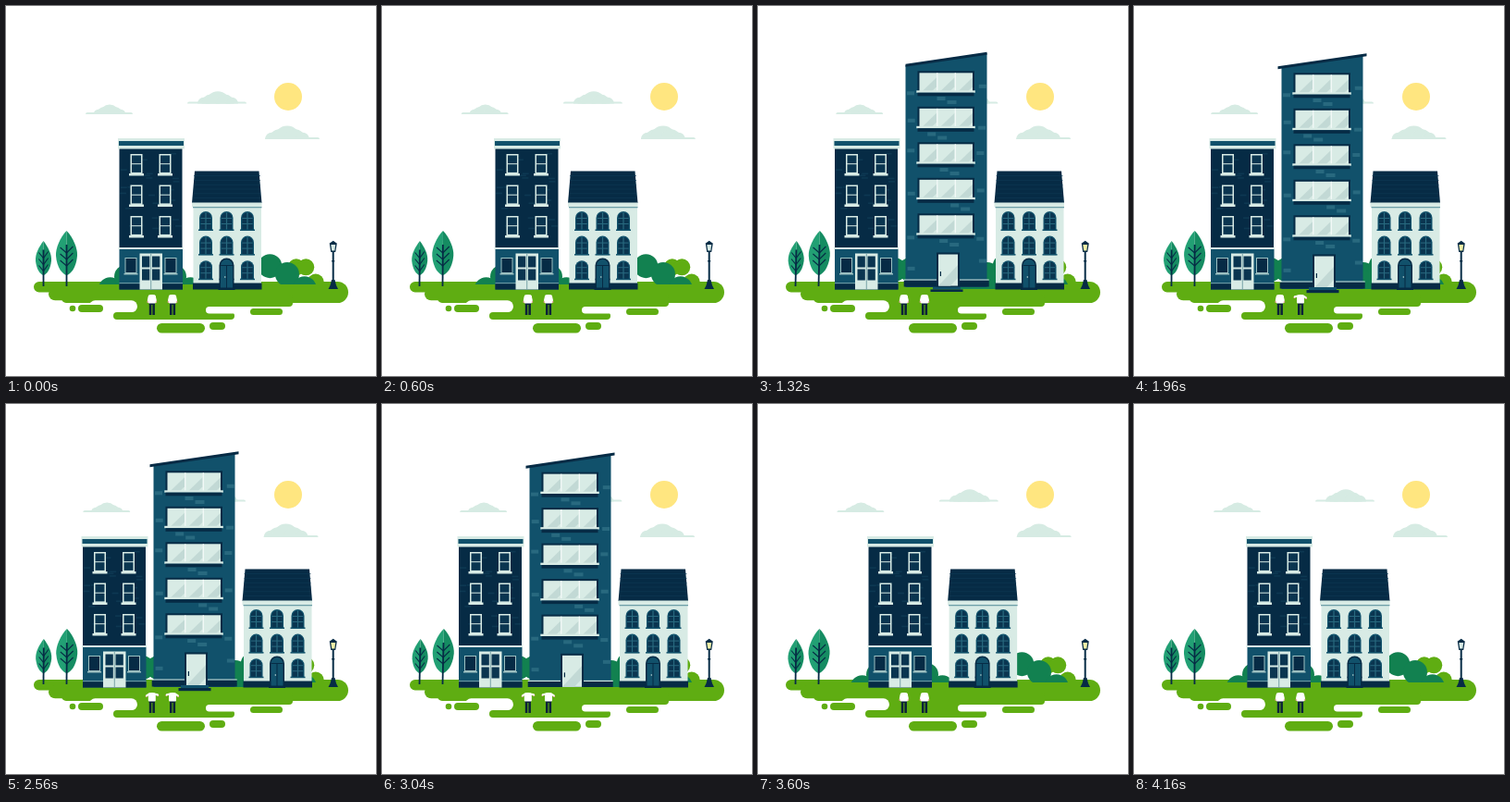
Write an HTML page with a canvas that moves like this. It is 400 px wide and 400 px high and loops after 4.2 s.

```html
<!DOCTYPE html>
<html lang="en">
<head>
<meta charset="utf-8">
<title>Street</title>
<style>
html, body { margin: 0; width: 100%; height: 100%; overflow: hidden; background: #fff; }
canvas { display: block; width: 400px; height: 400px; }
</style>
</head>
<body>
<canvas id="stage"></canvas>
<script>
const canvas = document.getElementById('stage');
const ctx = canvas.getContext('2d');
const dpr = window.devicePixelRatio || 1;
canvas.width = canvas.height = 400 * dpr;

const LOOP = 4200, STEP = 40, FLOOR = 306;
const NAVY = '#062b45', DEEP = '#0a3550', TEAL = '#11516b', BRICK = '#28697f';
const PALE = '#d8ebe5', GLASS = '#c2d9d5', CLOUD = '#d6ebe3', SUN = '#ffe680';
const GRASS = '#5fad12', BUSH = '#128150';

// Drawing helpers
function rect(x, y, w, h, color) {
  ctx.fillStyle = color;
  ctx.fillRect(x, y, w, h);
}
function poly(color, ...pts) {
  ctx.fillStyle = color;
  ctx.beginPath();
  for (let i = 0; i < pts.length; i += 2) ctx.lineTo(pts[i], pts[i + 1]);
  ctx.fill();
}
function circle(x, y, r, color) {
  ctx.fillStyle = color;
  ctx.beginPath();
  ctx.arc(x, y, r, 0, Math.PI * 2);
  ctx.fill();
}
function pill(x, y, w, h, color = GRASS, r = Math.min(w, h) / 2) {
  ctx.fillStyle = color;
  ctx.beginPath();
  ctx.roundRect(x, y, w, h, r);
  ctx.fill();
}
function line(color, width, ...pts) {
  ctx.strokeStyle = color;
  ctx.lineWidth = width;
  ctx.beginPath();
  for (let i = 0; i < pts.length; i += 2) ctx.lineTo(pts[i], pts[i + 1]);
  ctx.stroke();
}
function arch(x, y, w, h, color) {
  pill(x, y, w, h, color, [w / 2, w / 2, 0, 0]);
}
function shifted(dx, dy, draw) {
  ctx.save();
  ctx.translate(dx, dy);
  draw();
  ctx.restore();
}
// Runs draw with everything below the line y hidden
function above(y, draw) {
  ctx.save();
  ctx.beginPath();
  ctx.rect(0, 0, 400, y);
  ctx.clip();
  draw();
  ctx.restore();
}
// Calls draw for every cell of a grid
function grid(cols, rows, draw) {
  for (let r = 0; r < rows; r++) for (let c = 0; c < cols; c++) draw(c, r);
}
function seeded(seed) {
  return () => (seed = seed * 16807 % 2147483647) / 2147483647;
}

// Timing helpers
const ramp = (t, a, b) => Math.max(0, Math.min(1, (t - a) / (b - a)));
const inOut = x => x < .5 ? 4 * x ** 3 : 1 - 4 * (1 - x) ** 3;
const outBack = (x, s) => 1 + (s + 1) * (x - 1) ** 3 + s * (x - 1) ** 2;
const pulse = (t, a, b, c, d) => inOut(ramp(t, a, b)) - inOut(ramp(t, c, d));

// Bumps shrink away from the peak, cut off along a flat base
function cloud(left, right, base, peak, height) {
  above(base, () => {
    pill(left, base - 2, right - left, 4, CLOUD);
    for (let k = -1; k <= 1; k += .5) {
      circle(peak + k * height * 1.15, base, height * (1 - .5 * Math.abs(k)), CLOUD);
    }
  });
}

function sky(sway) {
  circle(305, 98, 15, SUN);
  shifted(-3 * sway, 0, () => cloud(86, 137, 117, 112, 10.5));
  shifted(-sway, 0, () => cloud(196, 260, 105.5, 229, 13.3));
  shifted(-1.5 * sway, 0, () => cloud(280, 339, 144, 304, 14.5));
}

function ground() {
  pill(30, 298, 60, 11.5);
  pill(46, 304, 110, 14.3);
  pill(60, 298, 310, 23, GRASS, [5, 11.5, 11.5, 5]);
  pill(180, 312, 130, 13, GRASS, [0, 4, 4, 0]);
  rect(136, 306, 88, 32, GRASS);
  pill(116, 331, 131, 8);
  pill(90, 318.3, 52, 12.7, '#fff');
  pill(216, 325, 60, 7.5, '#fff');
  circle(72, 327, 3.3, GRASS);
  pill(78, 323, 27, 8);
  pill(264, 327, 35, 7);
  pill(163, 343, 52, 10.5);
  pill(220, 342, 17, 8);
}

// Circles whose tops follow half a sine wave
function bush(left, right, height, n, r, color) {
  for (let i = 0; i < n; i++) {
    const u = (i + .5) / n;
    circle(left + (right - left) * u, 301 - height * Math.sin(Math.PI * u) + r, r, color);
  }
}

function bushes() {
  above(301, () => {
    bush(298, 340, 30, 4, 9, GRASS);
    bush(104, 208, 30, 6, 13, BUSH);
    bush(220, 332, 34, 6, 13, BUSH);
  });
  poly(BUSH, 214, FLOOR, 236, 283, 270, 290, 270, FLOOR);
}

function tree(x, top, half, tilt) {
  const low = 291, mid = (top + low) / 2;
  ctx.save();
  ctx.transform(1, 0, -tilt, 1, 303 * tilt, 0);
  for (const [side, color] of [[-1, '#22a074'], [1, '#158c62']]) {
    ctx.fillStyle = color;
    ctx.beginPath();
    ctx.moveTo(x, top);
    ctx.bezierCurveTo(x + side * half * .6, top + 7, x + side * half * 1.05, mid - 5, x + side * half, mid + 3);
    ctx.bezierCurveTo(x + side * half * .9, low - 7, x + side * 4, low - 1, x, low);
    ctx.fill();
  }
  line(NAVY, 1.8, x, mid - 9, x, 303);
  for (let i = 0; i < 3; i++) {
    const y = mid - 1 + i * 7, w = half * .6;
    line(NAVY, 1.1, x - w, y - 5, x, y + 1, x + w, y - 6);
  }
  ctx.restore();
}

function lamp(lit) {
  rect(352.7, 266, 2, 35, NAVY);
  poly(NAVY, 349.3, 257, 353.7, 253.8, 358.2, 257);
  poly(NAVY, 349.8, 257, 357.7, 257, 356.2, 266, 351.2, 266);
  poly(lit ? '#f2f0a6' : PALE, 351.3, 258, 356.2, 258, 355.3, 264.5, 352.2, 264.5);
  rect(352.2, 275, 3, 1.5, NAVY);
  poly(NAVY, 352, 296, 355.5, 296, 357, 302, 359, FLOOR, 348.5, FLOOR, 350.5, 302);
}

function sashWindow(x, y) {
  rect(x - 6.5, y, 13, 22, PALE);
  for (const top of [1.5, 11.2]) rect(x - 5, y + top, 10, 8.7, DEEP);
  rect(x - 8, y + 21, 16, 2.5, PALE);
}

function shop() {
  const rand = seeded(11);
  rect(122.5, 150, 68, 112, NAVY);
  for (let i = 0; i < 26; i++) rect(123 + rand() * 60, 157 + rand() * 100, 7, 1.6, '#0d3852');
  rect(121, 143, 72, 11.5, PALE);
  rect(122, 146, 70, 5, TEAL);
  grid(2, 3, (c, r) => sashWindow(141 + c * 31, 160 + r * 33.5));

  rect(122.5, 261, 68.5, 45.5, TEAL);
  rect(121.5, 261, 70, 2, PALE);
  rect(122.5, 299.3, 68.5, 1, '#8fb5b8');
  rect(122.5, 300.3, 68.5, 6.2, NAVY);
  for (const x of [128.5, 171.5]) {
    rect(x, 272, 13, 17, '#9dc0c1');
    rect(x + 1, 273, 11, 15, NAVY);
    rect(x - 1, 289, 15, 1.5, '#9dc0c1');
  }
  rect(144.5, 267.5, 24.5, 39, PALE);
  grid(2, 2, (c, r) => rect(147 + c * 11, 270.5 + r * 14, 8.3, 12, DEEP));
  rect(156.3, 268, .9, 38.5, '#6d9aa2');
}

function archWindow(x, y) {
  arch(x - 7, y, 14, 20.5, TEAL);
  arch(x - 5.7, y + 1.3, 11.4, 19, DEEP);
  rect(x - .6, y + 1, 1.2, 19, BRICK);
  for (const bar of [7, 13]) rect(x - 5.7, y + bar, 11.4, 1, BRICK);
  rect(x - 8, y + 19.5, 16, 1.5, TEAL);
}

function house() {
  rect(202.5, 214, 73.5, 88, PALE);
  poly(NAVY, 204, 178.5, 273.5, 178.5, 276.5, 213, 201, 213);
  for (let i = 1; i < 7; i++) rect(203, 178.5 + i * 4.8, 72, .6, '#0e3954');
  rect(201, 212.5, 75.5, 4.5, PALE);
  rect(202, 217, 74.5, 1.3, '#6d9fa8');
  grid(3, 3, (c, r) => archWindow(216 + c * 22.5, 222 + r * 26.6));
  rect(202, 299.5, 74.5, 7, NAVY);
  arch(230.5, 272.5, 16, 34, NAVY);
  arch(232, 274, 13, 32.5, TEAL);
  rect(232, 280, 13, 1, NAVY);
  rect(238, 281, 1, 25, NAVY);
  circle(236.8, 293, .7, PALE);
  rect(229.5, 304.5, 18, 2.5, NAVY);
}

function officeWindow(y) {
  rect(172.5, y, 61.5, 23, NAVY);
  rect(174.5, y + 2, 57.5, 20, PALE);
  for (let i = 0; i < 3; i++) {
    const x = 174.5 + i * 19.5;
    poly(GLASS, x + 3, y + 22, x + 18.5, y + 7, x + 18.5, y + 17, x + 13.5, y + 22);
    if (i) rect(x - .8, y + 2, 1.2, 20, '#f6fbf9');
  }
  rect(171.3, y + 21, 63.5, 2.4, PALE);
  rect(172.5, y + 23.4, 61, 3.6, NAVY);
}

// Each storey has loose bricks beside its window and a pair below it
function bricks() {
  const rand = seeded(29);
  for (let floor = 0; floor < 6; floor++) {
    const y = 72 + floor * 38.5;
    rect(161 + rand() * 2, y + 6 + rand() * 20, 8, 4, BRICK);
    rect(236 + rand() * 3, y + 10 + rand() * 16, 8, 4, BRICK);
    if (floor === 5) continue;
    const x = 180 + rand() * 30;
    rect(x, y + 28, 9, 4, BRICK);
    rect(x + 11, y + 32, 10, 4, BRICK);
  }
}

function office(overhang) {
  poly(TEAL, 159.5, 66, 247.5, 53, 247.5, FLOOR, 159.5, FLOOR);
  bricks();
  const roofY = x => 65.3 - (x - 156) * .147;
  const a = 159.5 - overhang, b = 247.5 + overhang;
  poly(NAVY, a, roofY(a), b, roofY(b), b, roofY(b) + 3, a, roofY(a) + 3);
  for (let i = 0; i < 5; i++) officeWindow(72.3 + i * 38.5);
  rect(157.7, 297.5, 92, 1.2, PALE);
  rect(157.7, 298.7, 92, 6.8, NAVY);
  rect(193, 268.5, 25, 37, NAVY);
  rect(195, 270.5, 21, 34, PALE);
  poly(GLASS, 195, 304.5, 216, 282, 216, 296, 208, 304.5);
  rect(196.8, 289, 1.2, 5, NAVY);
}

function man(x, left, right) {
  const dark = '#0b2238';
  for (const leg of [-3, .6]) rect(x + leg, 320, 2.5, 14, dark);
  rect(x - 3, 320, 6.1, 3, dark);
  ctx.lineCap = 'round';
  for (const [side, lift] of [[-1, left], [1, right]]) {
    const hx = x + side * (4.3 + 2.2 * lift), hy = 319.5 - 5 * lift;
    circle(hx, hy + .4, 1.1, '#e8a79c');
    line('#fff', 2.2, x + side * 2.8, 313.5, hx - side * .4, hy - 1.2 + lift);
  }
  ctx.lineCap = 'butt';
  pill(x - 4, 312, 8, 9.5, '#fff', [3, 3, 1, 1]);
}

function draw(t) {
  const turn = Math.max(0, t - 200) / 4000 * Math.PI * 2;
  const sway = (1 - Math.cos(turn)) / 2;
  const tilt = .012 * (1 - Math.cos(turn * 2));
  const open = pulse(t, 590, 1210, 3160, 3760);
  const rise = outBack(ramp(t, 960, 1520), .65) - inOut(ramp(t, 2960, 3690));
  const overhang = 4 * pulse(t, 1360, 1600, 3060, 3300);
  const step = pulse(t, 1180, 1400, 2840, 3020);

  ctx.setTransform(dpr, 0, 0, dpr, 0, 0);
  rect(0, 0, 400, 400, '#fff');
  sky(sway);
  ground();
  bushes();
  tree(40.5, 254, 8.5, tilt);
  tree(65.5, 243, 11.5, tilt);
  lamp(t >= 1120 && t < 3840);
  if (rise > 0) above(FLOOR, () => shifted(0, 255 * (1 - rise), () => office(overhang)));
  if (step > 0) {
    rect(189, 304, 30, 3 * step, TEAL);
    rect(186.5, 304 + 3 * step, 35, 3.2 * step, NAVY);
  }
  shifted(-39.5 * open, 0, shop);
  shifted(54.5 * open, 0, house);
  const point = pulse(t, 2360, 2600, 3340, 3600);
  const shrug = pulse(t, 1640, 1880, 3060, 3300);
  man(157.8, point * .8, point);
  man(180, shrug, shrug * .8);
}

const start = performance.now();
function tick() {
  const t = (performance.now() - start) % LOOP;
  draw(Math.floor(t / STEP) * STEP);
  requestAnimationFrame(tick);
}
tick();
</script>
</body>
</html>
```
